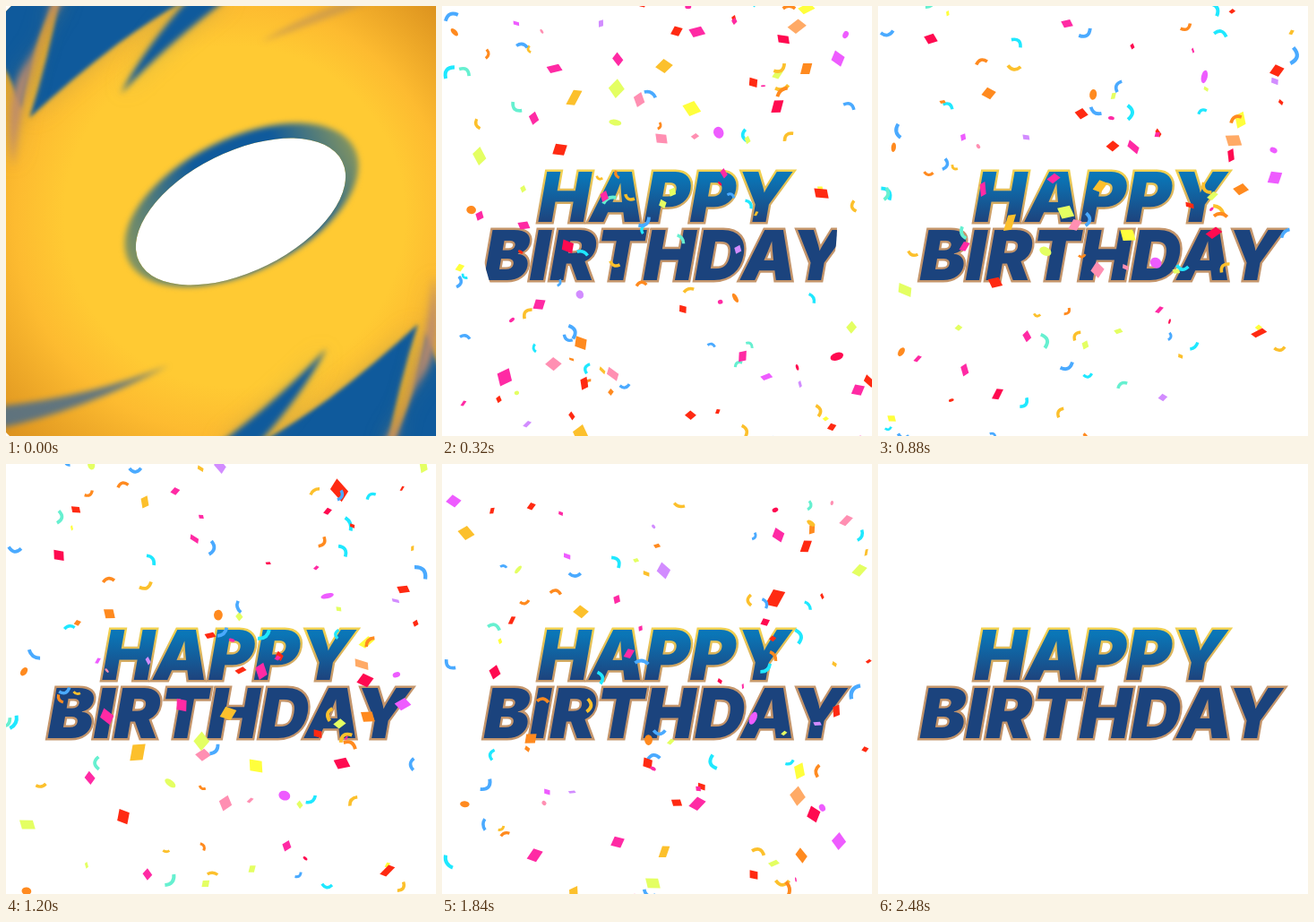
An HTML page with a canvas that plays this animation: 480 px wide and 480 px high, repeating every 2.52 s.

```html
<!DOCTYPE html>
<html lang="en">
<head>
<meta charset="utf-8">
<title>Happy Birthday</title>
<style>
  html, body { margin: 0; width: 100%; height: 100%; overflow: hidden; background: #fff; }
  svg, canvas { position: absolute; left: 0; top: 0; width: 480px; height: 480px; }
  text {
    font: 900 77px Inter, "Open Sans", sans-serif;
    text-anchor: middle;
    stroke-width: 5;
    stroke-linejoin: miter;
    paint-order: stroke;
  }
</style>
</head>
<body>
<svg id="title" viewBox="0 0 480 480">
  <defs>
    <linearGradient id="fillTop" x1="0" y1="0" x2="0" y2="1">
      <stop offset=".25" stop-color="#0a76b7"/>
      <stop offset=".78" stop-color="#1d457f"/>
    </linearGradient>
    <linearGradient id="edgeTop" x1="0" y1="0" x2="0" y2="1">
      <stop offset=".22" stop-color="#f0d050"/>
      <stop offset=".75" stop-color="#c89a6a"/>
    </linearGradient>
  </defs>
  <text transform="translate(243.5 241) skewX(-10)" fill="url(#fillTop)" stroke="url(#edgeTop)">HAPPY</text>
  <text transform="translate(244 306) skewX(-10)" fill="#1b437d" stroke="#c4956b">BIRTHDAY</text>
</svg>
<canvas id="stage" width="480" height="480"></canvas>
<script>
const LOOP = 2520, STEP = 40, REF = 1.48, TAU = Math.PI * 2;
const title = document.getElementById('title');
const ctx = document.getElementById('stage').getContext('2d');

const COLORS = {
  red: '#ff2a12', crimson: '#ff0a50', magenta: '#ff2aa4', pink: '#ff8fb2',
  violet: '#d28cff', purple: '#ee5cff', yellow: '#ffff3c', lime: '#e4ff62',
  orange: '#ff8a1f', gold: '#fcc02c', peach: '#ffaa66', blue: '#4aaaff',
  cyan: '#1fe8ff', mint: '#66f0d0'
};
const PAPER = ['red', 'crimson', 'magenta', 'magenta', 'pink', 'violet', 'purple', 'yellow', 'lime', 'orange', 'gold', 'red'];
const RIBBON = ['gold', 'gold', 'orange', 'blue', 'cyan', 'blue', 'mint'];

let seed = 77;
const rnd = () => (seed = (seed * 16807) % 2147483647) / 2147483647;
const between = (a, b) => a + (b - a) * rnd();
const pick = list => list[Math.floor(rnd() * list.length)];
const clamp = v => Math.min(1, Math.max(0, v));

// Large pieces: place at time REF, then size and colour
const papers = [
  [372, 82, 19, 'red'], [27, 14, 12, 'gold'], [413, 10, 10, 'orange'], [466, 53, 13, 'lime'],
  [78, 105, 9, 'red'], [155, 96, 11, 'gold'], [59, 159, 11, 'crimson'], [285, 296, 14, 'magenta'],
  [375, 405, 14, 'crimson'], [397, 288, 15, 'peach'], [443, 335, 13, 'purple'], [248, 346, 13, 'gold'],
  [196, 336, 11, 'magenta'], [348, 370, 9, 'red'], [279, 408, 14, 'yellow'], [147, 392, 18, 'gold'],
  [245, 452, 12, 'pink'], [220, 395, 12, 'pink'], [262, 295, 10, 'red'], [131, 468, 12, 'red']
];
const ribbons = [
  [193, 45, 14, 'cyan'], [408, 90, 11, 'cyan'], [10, 150, 14, 'blue'], [345, 84, 12, 'gold'],
  [462, 180, 18, 'blue'], [455, 406, 13, 'blue'], [340, 447, 13, 'cyan'], [388, 450, 13, 'gold'],
  [92, 85, 10, 'orange'], [8, 356, 16, 'cyan'], [380, 376, 15, 'gold'], [232, 388, 14, 'blue']
];

function piece(x, y, size, color, shape, drift) {
  return {
    x, y, size, shape, drift, color: COLORS[color],
    angle: between(0, TAU), spin: between(-4, 4),
    flip: between(0, TAU), tumble: between(3, 8), ratio: between(.7, 1.1)
  };
}

const confetti = [
  ...papers.map(p => piece(...p, 'quad', 0)),
  ...ribbons.map(p => piece(...p, 'arc', 0))
];
for (let i = 0; i < 178; i++) {
  const arc = rnd() < .38;
  confetti.push(piece(
    between(-10, 490), between(-20, 900),
    arc ? between(7, 16) : 5 + 10 * rnd() ** 1.8,
    pick(arc ? RIBBON : PAPER),
    arc ? 'arc' : rnd() < .22 ? 'oval' : 'quad',
    between(-28, 28)
  ));
}

function drawPiece(p, t) {
  const dt = t - REF, burst = 1 - Math.exp(-t / .06);
  const x = p.x + p.drift * dt;
  const y = p.y + (172 + .2 * p.y) * dt;
  const s = p.size, squash = .5 + .5 * Math.abs(Math.cos(p.flip + p.tumble * dt));
  ctx.save();
  ctx.translate(240 + (x - 240) * burst, 245 + (y - 245) * burst);
  ctx.rotate(p.angle + p.spin * dt);
  ctx.beginPath();
  if (p.shape === 'arc') {
    ctx.strokeStyle = p.color;
    ctx.lineWidth = 1.8 + s * .14;
    ctx.moveTo(-s / 2, 0);
    ctx.quadraticCurveTo(0, -s * .65 * squash, s / 2, 0);
    ctx.stroke();
  } else {
    ctx.fillStyle = p.color;
    ctx.scale(1, squash * p.ratio);
    if (p.shape === 'oval') {
      ctx.ellipse(0, 0, s / 2, s * .42, 0, 0, TAU);
    } else {
      ctx.transform(1, 0, .2, 1, 0, 0);
      ctx.rect(-s / 2, -s / 2, s, s);
    }
    ctx.fill();
  }
  ctx.restore();
}

// Swirl arms; each is drawn again after half a turn
const ARMS = [
  ['M62 -20 Q50 50 26 125 Q72 82 125 42 Q175 6 225 -20Z', '#0f5a9c', 2],
  ['M-30 -30 L62 -20 Q32 30 16 115 Q-2 45 -30 60Z', '#0f5a9c', 2],
  ['M66 -10 Q20 55 8 180 Q-4 100 24 62 Q45 30 52 -10Z', '#bd8b6c', 4],
  ['M128 98 Q157 43 206 -10 L250 -10 Q182 40 128 98Z', '#0f5a9c', 3]
].map(([d, color, blur]) => ({ path: new Path2D(d), color, blur }));
const wisp = new Path2D('M285 40 Q335 8 395 -10 L420 -10 Q350 18 285 40Z');
const tail = new Path2D('M-20 448 Q90 438 182 401 Q80 455 -20 474Z');

function blob(path, color, blur) {
  ctx.filter = `blur(${blur}px)`;
  ctx.fillStyle = color;
  ctx.fill(path);
}

function ellipse(x, y, rx, ry) {
  const path = new Path2D();
  path.ellipse(x, y, rx, ry, -.46, 0, TAU);
  return path;
}

function drawSwirl(t) {
  const k = t / .2, round = clamp(k), zoom = 1 + 4.4 * k ** 1.3;
  ctx.save();
  ctx.translate(243, 241);
  ctx.rotate(k * .9);
  ctx.scale(zoom, zoom);
  ctx.translate(-243, -241);

  // Disc with an open centre
  const disc = new Path2D();
  disc.arc(243, 241, 338, 0, TAU);
  disc.addPath(ellipse(262 - 19 * round, 229.5 + 11 * round, 126.4, 66.7 + 45 * round));
  ctx.clip(disc, 'evenodd');

  const glow = ctx.createRadialGradient(255, 235, 190, 243, 241, 335);
  glow.addColorStop(0, '#ffca33');
  glow.addColorStop(.35, '#fdbb30');
  glow.addColorStop(1, '#dd941f');
  ctx.fillStyle = glow;
  ctx.fillRect(-100, -100, 690, 690);

  for (let turn = 0; turn < 2; turn++) {
    for (const arm of ARMS) {
      ctx.globalAlpha = .4;
      blob(arm.path, '#8c9160', 12);
      ctx.globalAlpha = 1;
      blob(arm.path, arm.color, arm.blur);
    }
    ctx.translate(486, 480);
    ctx.rotate(Math.PI);
  }
  ctx.globalAlpha = .65;
  blob(wisp, '#c09455', 3);
  ctx.globalAlpha = .9;
  blob(tail, '#526f88', 3);
  ctx.globalAlpha = 1;

  const rim = ctx.createLinearGradient(135, 285, 392, 160);
  rim.addColorStop(0, '#87965f');
  rim.addColorStop(.4, '#0f5a9c');
  rim.addColorStop(.72, '#0f5a9c');
  rim.addColorStop(1, '#87965f');
  blob(ellipse(263, 222, 141, 74), rim, 3);
  ctx.restore();
}

function draw(ms) {
  const t = Math.floor(ms / STEP) * STEP / 1000;
  ctx.clearRect(0, 0, 480, 480);
  const radius = 199 * Math.max(0, t - .08) / .24;
  title.style.clipPath = t < .5 ? `circle(${radius}px at 242px 245px)` : 'none';

  if (t > 0 && t < 2.24) {
    ctx.globalAlpha = clamp((2.24 - t) / .3);
    confetti.forEach(p => drawPiece(p, t));
    ctx.globalAlpha = 1;
  }
  if (t < .24) drawSwirl(t);
}

const start = performance.now();
function tick() {
  draw((performance.now() - start) % LOOP);
  requestAnimationFrame(tick);
}
tick();
</script>
</body>
</html>
```
